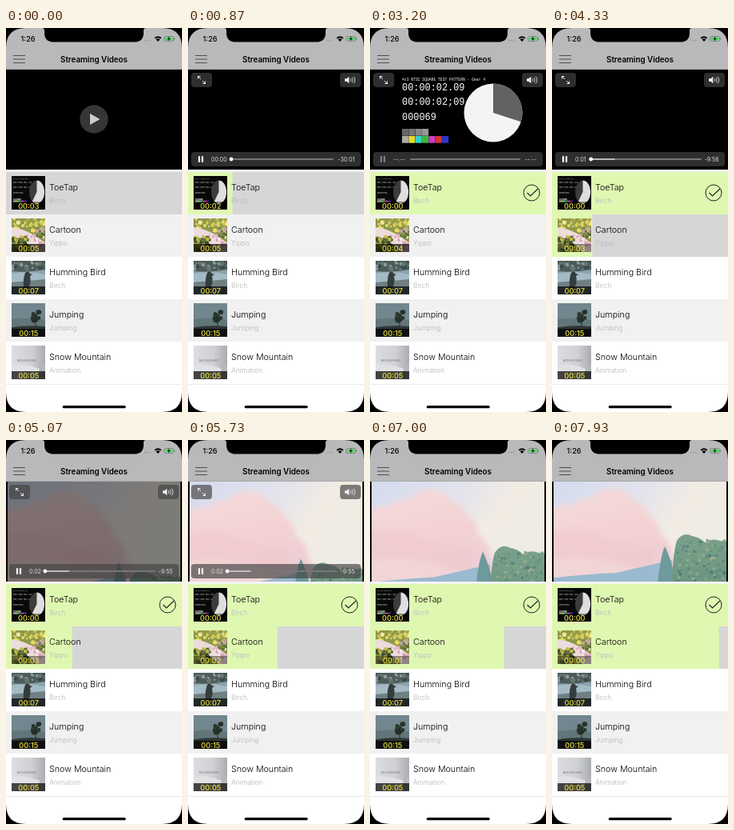
These frames come from a looping animation (220x480 px, 8 s). An HTML page:

```html
<!DOCTYPE html>
<html lang="en">
<head>
<meta charset="utf-8">
<title>Streaming Videos</title>
<style>
  html, body { margin: 0; width: 100%; height: 100%; overflow: hidden; background: #000; }
  svg { display: block; width: 220px; height: 480px; }
  text { font-family: Inter, Roboto, sans-serif; }
  .mono text { font-family: "Liberation Mono", monospace; fill: #fff; }
  .time { font-size: 7px; fill: #ddd; }
  .name { font-size: 10.7px; font-weight: 300; fill: #000; }
  .by { font-size: 8.5px; font-weight: 300; fill: #b4b4b4; }
  .left { font-size: 9.2px; font-weight: 500; fill: #eee33c; text-anchor: middle; }
</style>
</head>
<body>
<svg viewBox="0 0 220 480">
  <defs>
    <clipPath id="screen"><rect y="52" width="220" height="125"/></clipPath>
    <clipPath id="thumb"><rect width="42" height="42"/></clipPath>
    <linearGradient id="sky" x2="1" y2=".4">
      <stop stop-color="#d3dbee"/><stop offset=".5" stop-color="#e4e4ec"/><stop offset=".75" stop-color="#f2ece3"/><stop offset="1" stop-color="#eeece4"/>
    </linearGradient>
    <linearGradient id="cloud" x2=".3" y2="1">
      <stop stop-color="#f5dbdd"/><stop offset=".5" stop-color="#f4d2d3"/><stop offset="1" stop-color="#eccdd6"/>
    </linearGradient>
    <linearGradient id="leaves" x2="0" y2="1">
      <stop stop-color="#7ba18c"/><stop offset="1" stop-color="#5c8672"/>
    </linearGradient>
    <linearGradient id="snow" x2="1" y2="0">
      <stop stop-color="#dcdde0"/><stop offset=".6" stop-color="#cfd0d3"/><stop offset="1" stop-color="#aaacb0"/>
    </linearGradient>
    <filter id="soft"><feGaussianBlur stdDeviation="3"/></filter>
  </defs>
  <rect width="220" height="480" fill="#fff"/>
  <rect width="220" height="52" fill="#b9b9bb"/>
  <rect y="51.5" width="220" height=".5" fill="#999"/>
  <text x="18.6" y="17" font-size="9.1" font-weight="500">1:26</text>
  <g fill="#999"><circle cx="173.5" cy="15.5" r=".9"/><circle cx="176.5" cy="15.5" r=".9"/><circle cx="179.5" cy="15.5" r=".9"/></g>
  <path d="M185.5 12.3q4.5-4 9 0l-1.2 1.3q-3.3-2.8-6.6 0zM187.4 14.3q2.6-2.2 5.2 0L190 17z"/>
  <rect x="197.5" y="10.5" width="12" height="6" rx="1.6" fill="none" stroke="#777" stroke-width=".7"/>
  <rect x="198.6" y="11.6" width="9.8" height="3.8" rx=".8" fill="#4cd964"/>
  <path d="M210.5 12.3v2.4" stroke="#777"/>
  <path d="M204.5 10l-3 4h2l-1 3 3.2-4h-2z" fill="#111"/>
  <path d="M9 34.5H24M9 39H24M9 43.5H24" stroke="#333" stroke-width=".8"/>
  <text x="110" y="42.5" font-size="9.8" font-weight="600" text-anchor="middle">Streaming Videos</text>

  <rect y="52" width="220" height="125" fill="#000"/>
  <g clip-path="url(#screen)">
    <g id="pattern" class="mono">
      <text x="40" y="65.5" font-size="4.7">4x3 NTSC SQUARE TEST PATTERN - Gear 4</text>
      <g font-size="11.9"><text id="code1" x="40" y="78"/><text id="code2" x="40" y="96"/><text id="count" x="40" y="115"/></g>
      <g id="bars"/>
      <circle id="disc" cx="154" cy="106" r="36.5"/><path id="wedge"/>
    </g>
    <g id="cartoon">
      <rect y="52" width="220" height="125" fill="url(#sky)"/>
      <g id="clouds" filter="url(#soft)">
        <path d="M-8 92Q8 78 24 82Q34 70 50 74Q56 61 75 61Q94 61 101 76Q116 79 121 94Q134 101 134 116Q150 126 150 143Q160 154 162 190H-8Z" fill="url(#cloud)"/>
        <path d="M-8 118Q30 104 60 118T128 132V190H-8Z" fill="#f0c8cc" opacity=".55"/>
        <path d="M-8 152Q40 140 86 156T146 158V190H-8Z" fill="#f3dcda" opacity=".6"/>
      </g>
      <path id="hill" d="M-5 173Q40 168 80 166Q115 158 150 150V240H-5Z" fill="#9bb9cf"/>
      <path id="cone" d="M128 240Q132 152 141 133Q149 148 156 182V240Z" fill="#6d9a9b"/>
      <g id="trees"/>
      <rect id="dim" y="52" width="220" height="125"/>
      <path d="M1 52V177M219 52V177" stroke="#000" stroke-width="2"/>
    </g>
    <g id="play">
      <circle cx="110" cy="114" r="17.7" fill="#363636"/><path d="M105 107L117.5 114L105 121Z" fill="#ccc"/>
    </g>
    <g id="controls">
      <g fill="#444" fill-opacity=".68">
        <rect x="4" y="56" width="26" height="18" rx="4"/><rect x="190" y="56" width="26" height="18" rx="4"/>
        <rect x="4" y="155" width="212" height="18" rx="4"/>
      </g>
      <path d="M16 64L12.5 60.5M12.5 63.5V60.5H15.5M18 66L21.5 69.5M21.5 66.5V69.5H18.5" fill="none" stroke="#eee"/>
      <path d="M196 63.3h2.3l3-2.6v8.6l-3-2.6H196z" fill="#eee"/>
      <path d="M203 63q1.5 2 0 4M205 61.8q2.6 3.2 0 6.4M207 60.6q3.6 4.4 0 8.8" fill="none" stroke="#eee" stroke-width=".8"/>
      <path id="pause" d="M14 160.3v7.4M18 160.3v7.4" stroke="#fff" stroke-width="2.2"/>
      <text id="played" class="time" x="29" y="166.5"/>
      <text id="remaining" class="time" x="208.5" y="166.5" text-anchor="end"/>
      <g stroke-width="1.8" stroke-linecap="round"><path id="track" stroke="#777"/><path id="buffer" d="M48 164H78" stroke="#bbb"/></g>
      <circle id="knob" cy="164" r="2.4" fill="#fff"/>
    </g>
  </g>
  <rect y="177" width="220" height="3" fill="#f4f4f4"/>
  <g id="rows"/>
  <path d="M0 445.5H220" stroke="#ddd" stroke-width=".6"/>
  <rect x="70.7" y="472" width="79" height="3.3" rx="1.6"/>
  <path fill-rule="evenodd" d="M0 0H220V480H0ZM0 25V455Q0 480 25 480H195Q220 480 220 455V25Q220 0 195 0H175Q172 0 172 3V6Q172 17.6 160 17.6H60Q48 17.6 48 6V3Q48 0 45 0H25Q0 0 0 25Z"/>
</svg>
<script>
const LOOP = 8000, ROW = 53, GREEN = "#dff8b1";
const $ = id => document.getElementById(id);
const clamp = x => Math.min(1, Math.max(0, x));
const ramp = (t, a, b) => clamp((t - a) / (b - a));
const pad = (n, size = 2) => String(n).padStart(size, "0");
const set = (el, props) => { for (const k in props) el.setAttribute(k, props[k]); };
const show = (id, on) => set($(id), { opacity: +on });
const lower = (id, dy) => set($(id), { transform: `translate(0 ${dy})` });

let seed = 7;
const rnd = () => (seed = seed * 16807 % 2147483647) / 2147483647;
const pick = list => list[Math.floor(rnd() * list.length)];

function dots(n, [x, y, w, h], size, colors) {
  let out = "";
  for (let i = 0; i < n; i++)
    out += `<circle cx="${(x + rnd() * w).toFixed(1)}" cy="${(y + rnd() * h).toFixed(1)}" r="${(size * (.5 + rnd())).toFixed(1)}" fill="${pick(colors)}"/>`;
  return out;
}
function bars(x, y, size) {
  const bright = ["#aaa", "#e5dc32", "#34cfd0", "#38bc39", "#cb3dc5", "#d5332e", "#3034d0"];
  const block = (c, i, row) => `<rect x="${x + i * size}" y="${y + row * size * 1.08}" width="${size * .97}" height="${size * 1.04}" fill="${c}"/>`;
  return ["#666", "#777", "#888", "#999"].map((c, i) => block(c, i, 0)).join("") + bright.map((c, i) => block(c, i, 1)).join("");
}
function sector(cx, cy, r, turn) {
  const a = turn * 2 * Math.PI;
  return `M${cx} ${cy}V${cy - r}A${r} ${r} 0 ${+(turn > .5)} 1 ${cx + r * Math.sin(a)} ${cy - r * Math.cos(a)}Z`;
}

const thumbs = [
  `<rect width="42" height="42" fill="#090909"/>
   <g class="mono" font-size="3.6" opacity=".75"><text x="2" y="4" font-size="1.5">4x3 NTSC SQUARE TEST</text><text x="2" y="9">00:00:02.21</text><text x="2" y="15">00:00:02;21</text><text x="2" y="22">000081</text></g>
   ${bars(2, 28, 2.4)}
   <g transform="translate(31.5 20) scale(.66 1)"><circle r="14.5" fill="#3c3c3c"/><path d="${sector(0, 0, 14.5, .6)}" fill="#dedede"/></g>`,
  `<rect width="42" height="42" fill="#8f984b"/>
   ${dots(60, [0, 0, 42, 17], 1.8, ["#e9dc62", "#d9cf4e", "#a3a650", "#efe79a"])}
   <path d="M0 11Q20 13 42 31V42H31Q18 26 0 22Z" fill="#ecdcdc"/>
   ${dots(22, [20, 19, 22, 16], 1.6, ["#e3b5c4", "#f4e8e8", "#d7a0b4"])}
   ${dots(45, [0, 23, 20, 19], 1.8, ["#47562f", "#5c6c38", "#c2b94c", "#39472b"])}
   ${dots(18, [31, 12, 11, 12], 1.7, ["#5a6a36", "#81904b", "#c3a2a5"])}`,
  `<rect width="42" height="42" fill="#8ba3ae"/><path d="M0 0H42V11Q20 15 0 13Z" fill="#4d5c5b"/>
   ${dots(26, [0, 0, 42, 12], 1.8, ["#3c4a48", "#657673", "#8b9c9d"])}
   <path d="M0 16Q20 12 42 17V24L0 27Z" fill="#a4bac5"/><path d="M0 27L42 23V42H0Z" fill="#707f82"/>
   <path d="M15 34Q14 22 17 15Q20 11 23 16L26 17L23 19Q25 27 21 34L10 40Z" fill="#343d3d"/>`,
  `<rect width="42" height="42" fill="#71868e"/><path d="M0 20Q20 17 42 21V29H0Z" fill="#627579"/>
   ${dots(22, [25, 11, 10, 11], 2, ["#2c3a30", "#3a4a3c", "#253129"])}
   <path d="M30 17V30" stroke="#222b27"/><path d="M0 30Q20 27 42 29V42H0Z" fill="#2d3634"/>`,
  `<rect width="42" height="42" fill="url(#snow)"/><path d="M0 24Q18 21 42 32V42H0Z" fill="#e0e1e3"/>
   <path d="M30 42L36 27L42 23V42Z" fill="#b4b6b9"/><text x="19" y="20" font-size="4" text-anchor="middle" fill="#777">MOUNTAINS</text>`
];
const rows = [
  { name: "ToeTap", by: "Birch", seconds: 3, start: 113 },
  { name: "Cartoon", by: "Yippo", seconds: 5, start: 3190 },
  { name: "Humming Bird", by: "Birch", seconds: 7 },
  { name: "Jumping", by: "Jumping", seconds: 15 },
  { name: "Snow Mountain", by: "Animation", seconds: 5 }
];

$("rows").innerHTML = rows.map((r, i) => `
  <g transform="translate(0 ${180 + i * ROW})">
    <rect width="220" height="${ROW}" fill="${i % 2 ? "#f1f1f1" : "#fff"}"/>
    <rect id="picked${i}" width="220" height="${ROW}" fill="#d6d6d6" opacity="0"/>
    <rect id="progress${i}" width="0" height="${ROW}" fill="${GREEN}"/>
    <g transform="translate(7 5)" clip-path="url(#thumb)">${thumbs[i]}
      <rect id="band${i}" y="32" width="42" height="10" fill="#000" opacity=".7"/></g>
    <text id="left${i}" class="left" x="28.3" y="45.5">00:${pad(r.seconds)}</text>
    <text class="name" x="54" y="23.2">${r.name}</text><text class="by" x="54" y="39">${r.by}</text>
    <g id="check${i}" fill="none" stroke="#222" stroke-width="1" opacity="0">
      <circle cx="202" cy="26" r="10"/><path d="M196.5 26L200.5 30L210 21" stroke-width="1.2"/></g>
  </g>`).join("");
$("bars").innerHTML = bars(40, 126, 8.35);
$("trees").innerHTML = `
  <path d="M146 260Q149 145 156 126Q164 114 175 120Q184 121 191 128Q201 122 210 126L222 128V260Z" fill="url(#leaves)"/>
  ${dots(170, [156, 125, 64, 70], 1.5, ["#4f7d6b", "#83a97f", "#6c957f", "#9aab8c", "#5d8a86"])}`;

function drawRow(r, i, t) {
  if (r.start === undefined) return;
  const done = ramp(t, r.start, r.start + r.seconds * 1000);
  const active = i ? ramp(t, r.start, r.start + 250) : 1;
  set($("picked" + i), { opacity: active });
  set($("progress" + i), { width: 220 * done });
  set($("band" + i), { opacity: .7 - .3 * active });
  set($("check" + i), { opacity: +(done === 1) });
  $("left" + i).textContent = "00:" + pad(Math.floor(r.seconds * (1 - done) + 1e-6));
}

function drawPattern(t) {
  const frame = Math.floor(Math.min(2.3, Math.max(0, (t - 900) / 1000)) * 30 + 1e-6);
  const sec = Math.floor(frame / 30), ff = pad(frame % 30), clock = "00:00:" + pad(sec);
  $("code1").textContent = clock + "." + ff;
  $("code2").textContent = clock + ";" + ff;
  $("count").textContent = pad(frame, 6);
  const shades = ["#f4f4f4", "#626262"];
  set($("disc"), { fill: shades[sec % 2] });
  set($("wedge"), { d: sector(154, 106, 36.5, frame % 30 / 30), fill: shades[(sec + 1) % 2] });
}

function drawControls(t) {
  const loading = t >= 3130 && t < 3550, second = t >= 3550;
  const played = Math.max(0, Math.round((t - 3370) / 1000));
  const [from, to] = loading ? [51, 187] : second ? [47, 186] : [53, 181];
  $("played").textContent = loading ? "--:--" : second ? "0:" + pad(played) : "00:00";
  $("remaining").textContent = loading ? "--:--" : second ? "-9:" + pad(57 - played) : "-30:01";
  set($("track"), { d: `M${from} 164H${to}` });
  show("buffer", second);
  set($("knob"), { cx: second ? 48.5 + (t - 3550) / 4000 : 54, opacity: +!loading });
  set($("pause"), { opacity: loading ? .4 : 1 });
  set($("controls"), { opacity: ramp(t, 600, 800) * (1 - ramp(t, 6300, 6550)) });
}

// Nearer layers climb faster as the camera tilts down.
function drawCartoon(t) {
  const rise = (LOOP - 70 - t) / 1000;
  lower("clouds", 1.2 * rise);
  lower("hill", 6 * rise);
  lower("cone", 7 * rise);
  lower("trees", 16 * rise);
  set($("dim"), { opacity: 1 - ramp(t, 4400, 5700) });
}

function draw(t) {
  rows.forEach((r, i) => drawRow(r, i, t));
  show("play", t < 650);
  show("pattern", t >= 900 && t < 3550);
  show("cartoon", t >= 3550);
  drawPattern(t);
  drawControls(t);
  drawCartoon(t);
}

const began = performance.now();
(function tick() {
  draw((performance.now() - began) % LOOP);
  requestAnimationFrame(tick);
})();
</script>
</body>
</html>
```
